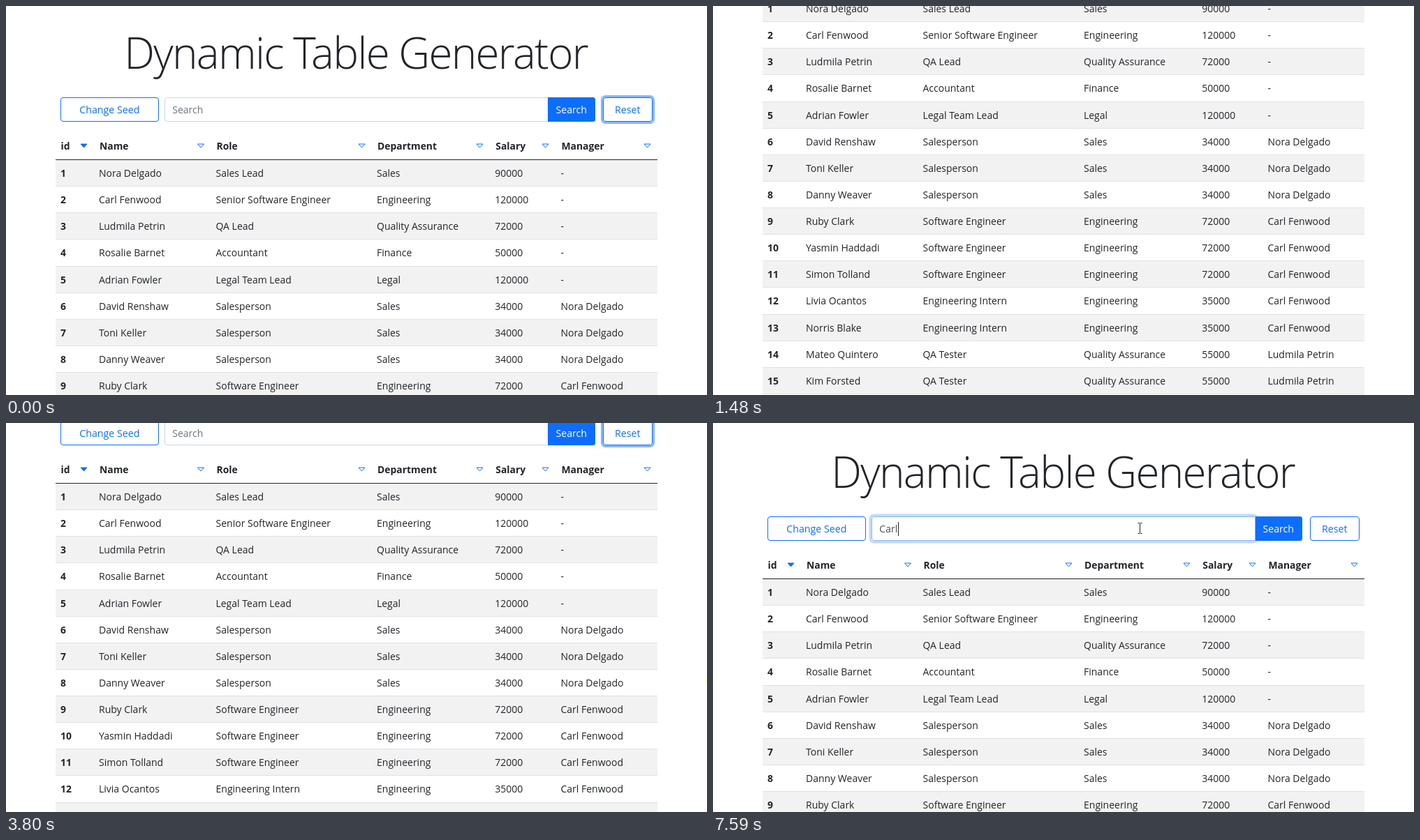
Recreate the animation shown at these times as an HTML page. Size 1004 by 558 pixels, loop 8 s.

```html
<!DOCTYPE html>
<html lang="en">
<head>
<meta charset="utf-8">
<title>Dynamic Table Generator</title>
<style>
  html, body { margin: 0; width: 100%; height: 100%; overflow: hidden; background: #fff; }
  svg { display: block; }
  text { font: 14px "Open Sans", "Noto Sans", sans-serif; fill: #212529; white-space: pre; }
  .title { font-size: 62px; font-weight: 300; letter-spacing: -.028em; }
  .bold { font-weight: 700; font-size: 13.9px; }
  .button { font-size: 14.2px; }
  .mid { text-anchor: middle; }
  .blue { fill: #0d6efd; }
  .white { fill: #fff; }
  .hint { fill: #6c757d; }
  .typed { fill: #495057; }
  .outline { fill: #fff; stroke: #0d6efd; }
  .line { shape-rendering: crispEdges; }
</style>
</head>
<body>
<svg id="stage" width="1004" height="558" viewBox="0 0 1004 558"></svg>
<script>
const LOOP = 8000, STEP = 77.2, FIRST = 80;
const ROW = 38.125;
const PRESS = 5735, RELEASE = 5885;

const people = [
  "Nora Delgado|Sales Lead|Sales|90000",
  "Carl Fenwood|Senior Software Engineer|Engineering|120000",
  "Ludmila Petrin|QA Lead|Quality Assurance|72000",
  "Rosalie Barnet|Accountant|Finance|50000",
  "Adrian Fowler|Legal Team Lead|Legal|120000",
  "David Renshaw|Salesperson|Sales|34000|0",
  "Toni Keller|Salesperson|Sales|34000|0",
  "Danny Weaver|Salesperson|Sales|34000|0",
  "Ruby Clark|Software Engineer|Engineering|72000|1",
  "Yasmin Haddadi|Software Engineer|Engineering|72000|1",
  "Simon Tolland|Software Engineer|Engineering|72000|1",
  "Livia Ocantos|Engineering Intern|Engineering|35000|1",
  "Norris Blake|Engineering Intern|Engineering|35000|1",
  "Mateo Quintero|QA Tester|Quality Assurance|55000|2",
  "Kim Forsted|QA Tester|Quality Assurance|55000|2",
  "Charlotte Hume|Lawyer|Legal|100000|4"
].map(line => line.split("|"));

// label, text x, sort icon x
const columns = [
  ["id", 78, 111.5], ["Name", 133, 279], ["Role", 300.5, 509.5],
  ["Department", 531, 678.5], ["Salary", 700.3, 772.5], ["Manager", 794.5, 918.5]
];

// [time, value...]
const scrollKeys = [[0, 3], [1006, 141], [1860, 289], [2793, 289], [3400, 233], [3785, 137], [4480, 0]];
const dragKeys = [[2793, 1014.5, 471], [3400, 1013.5, 434], [3785, 1014.5, 371], [4480, 1009, 262], [4557, 1007.6, 253]];
const mouseKeys = [[5250, 997, 177], [5410, 880, 131], [5560, 690, 138], [5650, 611, 151]];
const typing = [[0, ""], [6670, "C"], [7280, "Ca"], [7360, "Car"], [7590, "Carl"]];

const stage = document.getElementById("stage");

function add(parent, tag, attrs, text) {
  const el = document.createElementNS("http://www.w3.org/2000/svg", tag);
  for (const name in attrs) el.setAttribute(name, attrs[name]);
  if (text !== undefined) el.textContent = text;
  return parent.appendChild(el);
}
const label = (parent, x, y, text, cls = "") => add(parent, "text", { x, y, class: cls }, text);
const box = (parent, x, y, width, height, attrs) => add(parent, "rect", { x, y, width, height, ...attrs });
const show = (el, on) => el.setAttribute("visibility", on ? "visible" : "hidden");
const move = (el, x, y) => el.setAttribute("transform", `translate(${x} ${y})`);

const page = add(stage, "g");
label(page, 501.2, 93, "Dynamic Table Generator", "title mid");

// Toolbar
box(page, 78.5, 134.5, 140, 34, { rx: 3.5, class: "outline" });
label(page, 148.3, 157, "Change Seed", "button blue mid");
const inputRing = box(page, 225.2, 132.2, 553.6, 38.6, { rx: 5, fill: "none", stroke: "#0d6efd", "stroke-opacity": .25, "stroke-width": 3.5 });
const input = add(page, "path", { d: "M776.5 134.5H230.5Q227.5 134.5 227.5 138V165Q227.5 168.5 230.5 168.5H776.5Z", fill: "#fff" });
add(page, "path", { d: "M776 134H840.5Q844 134 844 137.5V165.5Q844 169 840.5 169H776Z", class: "blue" });
const inputEdge = add(page, "path", { d: "M776.5 134V169", stroke: "#86b7fe" });
label(page, 809.7, 157, "Search", "button white mid");
const resetRing = box(page, 853.5, 132.5, 74, 38, { rx: 5, fill: "none", stroke: "#86b7fe", "stroke-width": 3 });
box(page, 855.5, 134.5, 70, 34, { rx: 3.5, class: "outline" });
label(page, 890.3, 157, "Reset", "button blue mid");
const hint = label(page, 238.3, 157, "Search", "hint");
const typed = label(page, 238.3, 157, "", "typed");
const caret = box(page, 239, 142, 1, 20, { fill: "#212529", class: "line" });

// Table
columns.forEach(([name, x, icon], i) => {
  label(page, x + (i ? 1 : .5), 209, name, "bold");
  add(page, "path", {
    d: `M${icon - 4.5} 201H${icon + 4.5}L${icon} 206Z`,
    fill: i ? "#fff" : "#0d6efd", stroke: "#0d6efd", "stroke-linejoin": "round"
  });
});
people.forEach(([name, role, dept, pay, boss], i) => {
  const top = i ? Math.round(261.2 + ROW * (i - 1)) + 1 : 224;
  const bottom = Math.round(261.2 + ROW * i);
  const base = Math.round(248 + ROW * i);
  if (i % 2 === 0) box(page, 71, top, 862, bottom - top, { fill: "#f2f2f2", class: "line" });
  box(page, 71, bottom, 862, 1, { fill: "#dee2e6", class: "line" });
  const cells = [i + 1, name, role, dept, pay, boss ? people[boss][0] : "-"];
  cells.forEach((cell, c) => label(page, columns[c][1], base, cell, c ? "" : "bold"));
});
box(page, 71, 223, 862, 1, { fill: "#212529", class: "line" });

// Pointer
const halo = add(stage, "circle", { r: 11.5, fill: "#ff0", "fill-opacity": .5 });
const arrow = add(stage, "path", { d: "M.5 .5V16L4 12.6L6.5 18L9 17L6.6 11.6H11.5Z", fill: "#fff", stroke: "#000" });
const beam = add(stage, "path", { d: "M-3 -7.5H-1L0 -6.8L1 -7.5H3M0 -7V7M-3 7.5H-1L0 6.8L1 7.5H3", fill: "none", stroke: "#222" });

// Smooth curve through the keys, flat at both ends and at holds
function curve(keys, t, c = 1) {
  const last = keys.length - 1;
  if (t <= keys[0][0]) return keys[0][c];
  if (t >= keys[last][0]) return keys[last][c];
  const i = keys.findIndex(k => k[0] > t) - 1;
  const slope = n => {
    if (n === 0 || n === last) return 0;
    const [a, b, d] = [keys[n - 1], keys[n], keys[n + 1]];
    return (b[c] - a[c]) * (d[c] - b[c]) <= 0 ? 0 : (d[c] - a[c]) / (d[0] - a[0]);
  };
  const [p, q] = [keys[i], keys[i + 1]];
  const span = q[0] - p[0], u = (t - p[0]) / span, v = 1 - u;
  return v * v * (1 + 2 * u) * p[c] + u * u * (3 - 2 * u) * q[c]
    + span * u * v * (v * slope(i) - u * slope(i + 1));
}

function render(t) {
  // The picture refreshes on a coarse beat
  const tick = t < FIRST ? 0 : FIRST + STEP * Math.floor((t - FIRST) / STEP);
  move(page, 0, -Math.round(curve(scrollKeys, tick)));

  const focus = t >= PRESS;
  const text = typing.filter(k => k[0] <= t).pop()[1];
  show(resetRing, !focus);
  show(inputRing, focus);
  show(inputEdge, focus);
  input.setAttribute("stroke", focus ? "#86b7fe" : "#ced4da");
  show(hint, !text);
  if (typed.textContent !== text) typed.textContent = text;
  caret.setAttribute("x", Math.round(239 + (text ? typed.getComputedTextLength() : 0)));
  show(caret, focus && !(t >= 6270 && t < 6670) && !(t >= 7200 && t < 7280));

  const dragging = t >= 2870 && t < 4720;
  const keys = dragging ? dragKeys : mouseKeys;
  const x = curve(keys, tick, 1), y = curve(keys, tick, 2);
  const inside = x < 777 && y > 134;
  [halo, arrow].forEach(el => move(el, x, y));
  move(beam, Math.round(x) + .5, Math.round(y));
  show(halo, dragging || (t >= PRESS && t < RELEASE));
  show(arrow, t >= 5270 && !inside);
  show(beam, t >= 5270 && inside);
}

const start = performance.now();
function frame() {
  render((performance.now() - start) % LOOP);
  requestAnimationFrame(frame);
}
frame();
</script>
</body>
</html>
```
